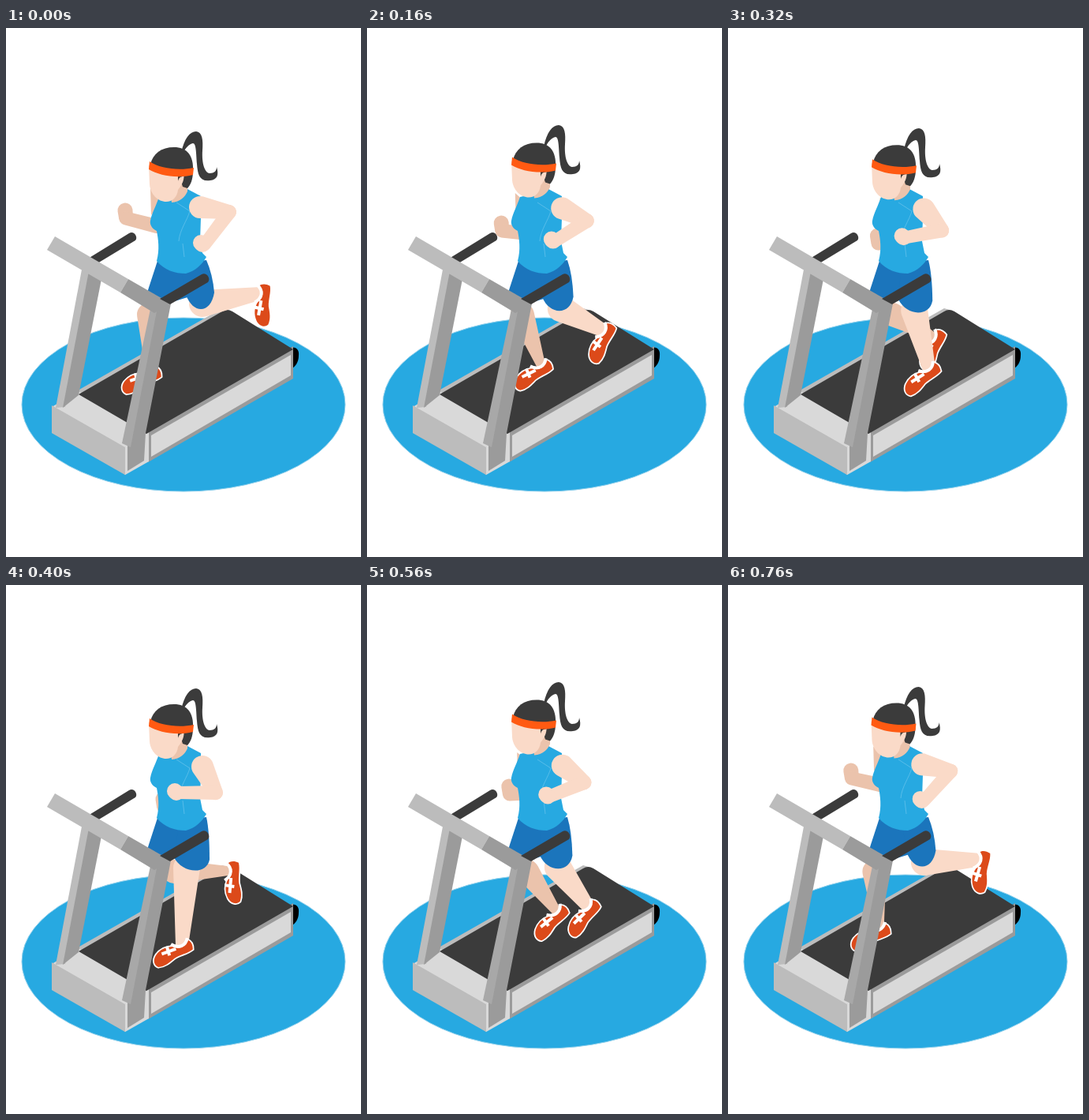
Animation, 450 px wide and 670 px high, one loop 0.8 s. Source, as an HTML page with a canvas:

```html
<!DOCTYPE html>
<html lang="en">
<head>
<meta charset="utf-8">
<title>Treadmill run</title>
<style>
html, body { margin: 0; width: 100%; height: 100%; overflow: hidden; background: #fff; }
canvas { display: block; }
</style>
</head>
<body>
<canvas id="stage" width="450" height="670"></canvas>
<script>
const ctx = document.getElementById('stage').getContext('2d');
const LOOP = 800, STEP = 40;
const SKIN = '#fadac8', SHADE = '#ebc3ac', BLUE = '#27a9e1', SHORTS = '#1b75bc',
  DARK = '#3b3b3b', RED = '#dc4a1a', BAND = '#ff5a12',
  LIGHT = '#d9d9d9', MID = '#bcbcbc', GREY = '#9b9b9b';

const mix = (a, b, p) => a + (b - a) * p;

function fill(color, d) {
  ctx.fillStyle = color;
  ctx.fill(new Path2D(d));
}
function line(color, width, d) {
  ctx.strokeStyle = color;
  ctx.lineWidth = width;
  ctx.stroke(new Path2D(d));
}
function poly(color, ...points) {
  fill(color, 'M' + points.join(' ') + 'Z');
}
// Tapered capsule between two joints
function limb(color, x1, y1, r1, x2, y2, r2) {
  const dir = Math.atan2(y2 - y1, x2 - x1);
  const side = Math.acos((r1 - r2) / Math.hypot(x2 - x1, y2 - y1));
  ctx.beginPath();
  ctx.arc(x1, y1, r1, dir + side, dir - side + 2 * Math.PI);
  ctx.arc(x2, y2, r2, dir - side, dir + side);
  ctx.fillStyle = color;
  ctx.fill();
}

function drawMachineBack() {
  ctx.beginPath();
  ctx.ellipse(225, 477, 205, 110, 0, 0, 2 * Math.PI);
  ctx.fillStyle = BLUE;
  ctx.fill();
  ctx.strokeStyle = '#8fd0ec';
  ctx.lineWidth = 1;
  ctx.stroke();

  fill('#000', 'M360 405C368 403 372 408 371 415C371 423 367 430 360 432Z');
  poly(MID, 84, 463, 274, 355, 284, 358, 100, 470);
  poly(GREY, 180, 509, 364, 403, 364, 444, 180, 550);
  poly(LIGHT, 184, 516, 361, 414, 361, 440, 184, 543);
  poly(LIGHT, 92, 460, 181, 508, 181, 549, 151, 566, 58, 480);
  fill(DARK, 'M92 464L274 359Q280 355 287 359L364 407L178 514Z');
  poly(MID, 58, 478, 151, 531, 151, 566, 58, 513);

  poly(MID, 96, 306, 107, 312, 75, 480, 63, 481);
  poly(GREY, 105, 308, 121, 318, 92, 465, 72, 481);
  fill(DARK, 'M104 292L156 260C162 256 168 265 164 269L116 298Z');
}

function drawMachineFront() {
  poly(GREY, 188, 358, 209, 349, 177, 513, 175, 548, 154, 561, 154, 529);
  poly('#a8a8a8', 183, 356, 191, 359, 158, 531, 147, 526);
  poly(MID, 62, 264, 155, 318, 145, 335, 52, 281);
  poly(GREY, 155, 318, 209, 349, 188, 361, 145, 335);
  fill(DARK, 'M195 343L248 312C254 309 260 317 256 322L208 350Z');
}

// The shoe is drawn from heel to toe along x, with y pointing away from the sole
function drawShoe(ankleX, ankleY, degrees) {
  const a = degrees * Math.PI / 180, c = Math.cos(a), s = Math.sin(a);
  const upper = 'M1 2C-2 8 -1 13 2 16C8 9 16 9 22 16C30 20 38 20 46 16C53 12 54 5 50 1C42 -2 35 0 27 2C18 3 9 0 1 2Z';
  ctx.save();
  ctx.transform(c, s, -s, c, ankleX, ankleY);
  ctx.translate(-11, -13);
  line('#fff', 3.5, upper);
  fill(RED, upper);
  line('#fff', 4, 'M1 18C7 10 17 10 23 20M20 12L39 14M29 20L31 8');
  ctx.restore();
}

function drawNearLeg(p) {
  const x = 323 - 25 * p - 75 * p * p, y = mix(336, 456, p);
  limb(SKIN, 249 - 20 * p * p, 349 + 20 * p - 11 * p * p, 17, x, y, 8);
  drawShoe(x, y, mix(94, 154, p));
}

function drawFarLeg(p) {
  const lift = p ** 2.4;
  const x = 183 + 90 * p + 11 * p * p, y = mix(436, 362, lift);
  limb(SHADE, 181 + 45 * p - 13 * p * p, 363, 15, x, y, 5.5);
  drawShoe(x, y, mix(155, 89, lift));
}

function drawNearArm(p) {
  const q = 1 - p;
  const elbowX = 283 * q * q + 560 * p * q + 266 * p * p;
  const elbowY = 233 * q * q + 492 * p * q + 263 * p * p;
  const fistX = mix(247, 214, p), fistY = mix(273, 262, p);
  limb(SKIN, mix(246, 249, p), mix(227, 230, p), 14, elbowX, elbowY, 9);
  limb(SKIN, elbowX, elbowY, 9, fistX + 5, fistY + 1, 8);
  limb(SKIN, fistX + 2, fistY + 1, 10, fistX, fistY - 1, 10);
}

function drawFarArm(p) {
  const x = mix(151, 199, p), y = mix(231, 271, p);
  poly(SHADE, mix(183, 195, p), mix(203, 218, p), 200, 220, mix(184, 195, p), mix(237, 222, p));
  limb(SHADE, x, y, 9.5, x + 1, y + 9, 9);
  limb(SHADE, x + 1, y + 10, 8.5, mix(191, 206, p), mix(251, 272, p), 9);
}

function drawFarShort() {
  poly(SHORTS, 193, 292, 250, 296, 240, 338, 214, 346, 190, 350, 178, 338);
}

function drawNearShort(p) {
  const right = 264 - 6 * p, rightY = 335 + 13 * p;
  const left = 228 - 15 * p, leftY = 338 + 7 * p, sag = 26 - 6 * p;
  fill(SHORTS, `M220 298L254 294Q${262 - 4 * p} 312 ${right} ${rightY}
    C${right - 4} ${rightY + sag} ${left + 10} ${leftY + sag} ${left} ${leftY}Z`);
}

function drawTorso() {
  fill(BLUE, 'M194 214L212 210L230 204L247 213L247 240L246 270L249 285L254 290C249 299 240 308 228 311C214 311 201 307 191 295C195 281 193 267 191 257C185 254 182 249 183 244C185 234 190 226 194 214Z');
  line('#6cc4ec', .7, 'M216 221L233 232C230 243 220 256 219 270M224 273L226 290');
}

function drawHead(bob) {
  ctx.save();
  ctx.translate(2.5 * bob, -10 * bob);
  fill(DARK, 'M222 158C226 140 233 131 241 131C249 132 250 142 249 155C248 172 252 183 258 184C264 184 267 181 267 176C270 186 268 192 259 193C246 195 243 187 242 172C241 158 241 146 237 146C232 147 227 152 224 160Z');
  ctx.restore();

  ctx.save();
  ctx.translate(2.5 * bob, -7 * bob);
  fill(SHADE, 'M209 213L222 194L230 198L230 207C227 214 221 220 210 221Z');
  fill(DARK, 'M218 182L237 182C237 191 234 199 230 203L224 201Z');
  fill(SKIN, 'M181 174L225 182C227 190 224 198 218 205C217 214 211 220 203 220C193 220 183 211 182 198Z');
  fill(DARK, 'M218 185L226 185L225 188C221 188 219 190 218 194Z');
  fill(DARK, 'M183 173C186 159 197 151 213 151C229 151 238 161 237 181C217 184 198 182 183 173Z');
  fill(BAND, 'M182 169C195 178 219 181 238 177L237 186C217 191 194 187 181 179Z');
  ctx.restore();
}

function drawRunner(p) {
  drawFarArm(p);
  drawFarLeg(p);
  drawFarShort();
  drawNearLeg(p);
  drawNearShort(p);
  drawTorso();
  drawNearArm(p);
  drawHead(1 - Math.abs(2 * p - 1));
}

// The stride swings forward for half the loop, then back the same way
function frame(now) {
  const t = Math.floor(now % LOOP / STEP) * STEP;
  const p = 1 - Math.abs(2 * t / LOOP - 1);
  ctx.fillStyle = '#fff';
  ctx.fillRect(0, 0, 450, 670);
  drawMachineBack();
  drawRunner(p);
  drawMachineFront();
}

const start = performance.now();
function tick() {
  frame(performance.now() - start);
  requestAnimationFrame(tick);
}
tick();
</script>
</body>
</html>
```
